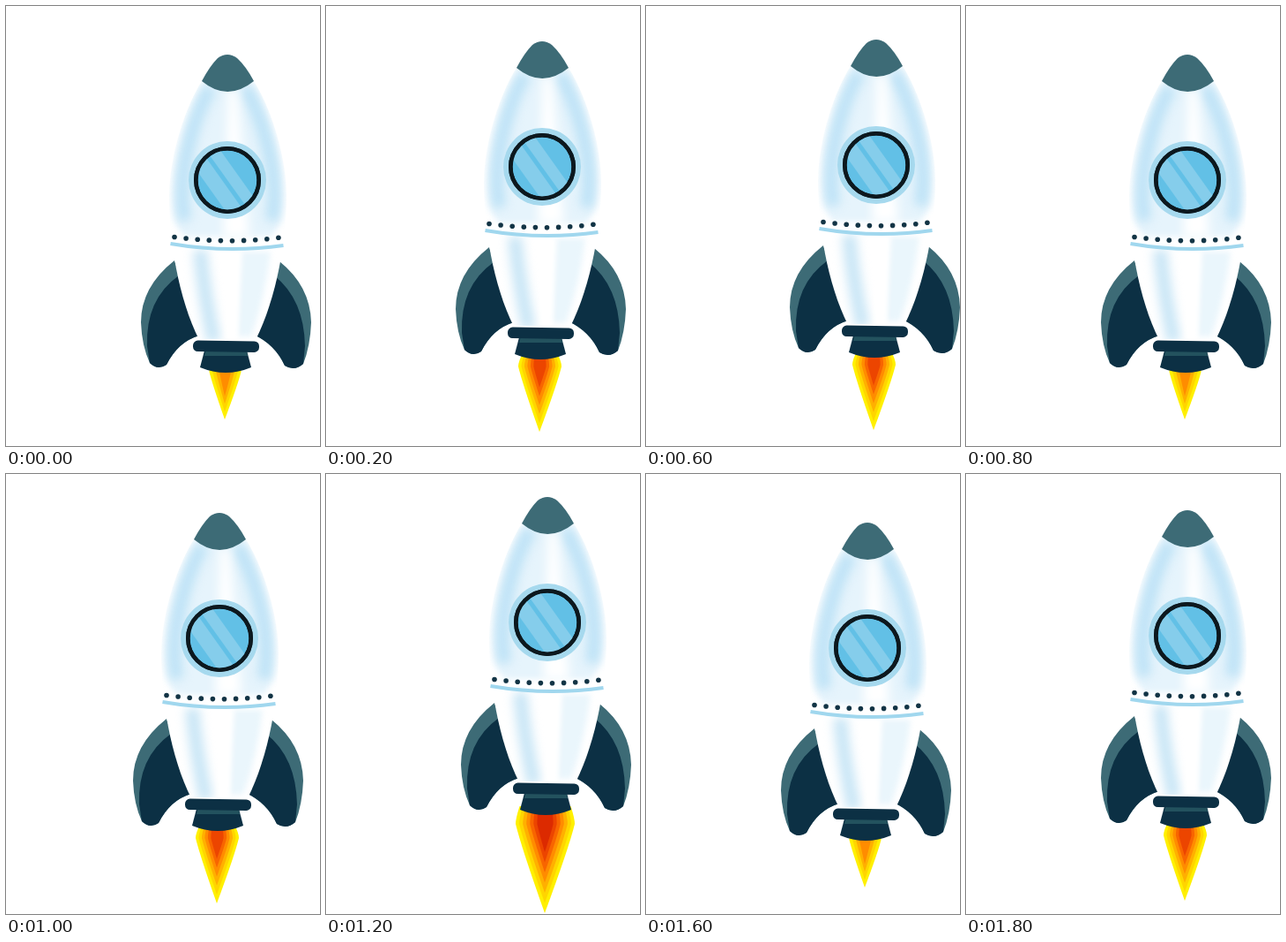
An HTML page for the animation above (2000 ms loop, 356x498 px).

```html
<!DOCTYPE html>
<html lang="en">
<head>
<meta charset="utf-8">
<title>Rocket</title>
<style>
  html, body { margin: 0; height: 100%; overflow: hidden; background: #fff; }
  svg { display: block; width: 100vw; height: 100vh; }
  .soft { filter: blur(3px); }
  .softer { filter: blur(6px); }
  .teal { fill: #3d6b76; }
  .navy { fill: #0c3044; }
  .line { fill: none; }
</style>
</head>
<body>
<svg viewBox="0 0 356 498">
  <defs>
    <clipPath id="hull"><path d="M222 85C200 120 185 175 185 215C185 265 195 330 219 377H283C307 330 318 265 318 215C318 175 303 120 281 85Z"/></clipPath>
    <clipPath id="glass"><circle r="34"/></clipPath>
  </defs>
  <g id="rocket">
    <g id="flame"></g>

    <path class="teal" d="M191 288Q153 318 153 358Q154 385 163 404Q172 413 182 406Q195 380 219 373Z"/>
    <path class="navy" d="M196 305Q158 332 160 385L163 404Q172 413 182 406Q195 380 219 373Z"/>
    <path class="teal" d="M310 289Q345 317 346 358Q345 385 337 405Q327 414 316 407Q305 383 281 372Z"/>
    <path class="navy" d="M304 305Q338 332 339 385L337 405Q327 414 316 407Q305 383 281 372Z"/>

    <path fill="#fff" d="M222 85C200 120 185 175 185 215C185 265 195 330 219 378H283C307 330 318 265 318 215C318 175 303 120 281 85Z"/>
    <g clip-path="url(#hull)">
      <path class="soft" fill="#e6f4fc" d="M224 85C203 122 189 175 189 215Q189 250 203 261H300Q314 250 314 215C314 175 300 122 279 85Z"/>
      <g class="softer line" stroke="#bde2f6" stroke-width="15">
        <path d="M232 92C213 125 200 175 200 212Q200 230 203 243"/>
        <path d="M271 92C290 125 304 175 304 212Q304 230 301 243"/>
      </g>
      <path class="softer" fill="#fff" d="M252 95H262L276 262H246Z"/>
      <path class="soft" fill="#eaf6fc" d="M262 278H300Q294 330 278 374H262Z"/>
      <path class="softer line" stroke="#c9e6f6" stroke-width="16" d="M220 276Q225 330 236 380"/>
      <path class="soft" fill="#fff" d="M247 276H268L262 378H250Z"/>
    </g>
    <path class="teal" d="M222 85Q231 68 240 59Q251 51 262 59Q272 68 281 85Q251 109 222 85Z"/>

    <g transform="translate(251 197)">
      <circle r="44" fill="#a6d9ee"/>
      <circle r="38" fill="#0c181e"/>
      <circle r="33.5" fill="#62c0e6"/>
      <g clip-path="url(#glass)"><g transform="rotate(-35.5)" fill="#85cdeb">
        <rect x="-22" y="-33" width="17" height="66"/>
        <rect x="0" y="-33" width="13" height="66"/>
      </g></g>
      <circle r="35.7" class="line" stroke="#0c181e" stroke-width="4.6"/>
    </g>

    <g id="rivets" fill="#123445"></g>
    <path class="line" stroke="#a0d7ee" stroke-width="4" d="M186.500 269Q251 280 314.500 271"/>

    <path class="navy" d="M225 390L220 409Q249 421 278 409L273 390Z"/>
    <path fill="#23525e" d="M226 391H273L274 396H225Z"/>
    <rect class="navy" x="212" y="379" width="75" height="12.500" rx="5.500" transform="rotate(.7 249 385)"/>
  </g>
</svg>
<script>
const $ = id => document.getElementById(id);
const STEP = 200;
const COLORS = ['#fff000', '#ffd500', '#ffb000', '#ff8c00', '#f86500', '#ec4500', '#dc2a00'];

// Flame sizes: half width at nozzle and shoulder, shoulder y, tip y, layers, tip shrink per layer
const FLAMES = {
  small: [17.5, 18, 414, 468, 4, .14],
  mid: [18, 24.5, 423, 497, 6, .11],
  large: [29, 33.5, 425, 526, 7, .095]
};

// Offset and flame of each pose
const POSES = [
  [0, 0, 'small'], [-6, -15, 'mid'], [0, -29, 'large'], [10, -17, 'mid'], [0, 0, 'small'],
  [-9, -11, 'mid'], [0, -29, 'large'], [7, -11, 'mid'], [0, 0, 'small'], [0, -14, 'mid']
];

function flame([nozzle, wide, shoulder, tip, layers, shrink]) {
  const cx = 248.5, top = 405;
  return COLORS.slice(0, layers).map((color, i) => {
    const s = 1 - i * .85 / layers, n = nozzle * s, w = wide * s;
    const end = top + (tip - top) * (1 - i * shrink);
    const mid = shoulder + (end - shoulder) * .25;
    return `<path fill="${color}" d="M${cx - n} ${top}Q${cx - w} ${shoulder - 6} ${cx - w} ${shoulder}` +
      `Q${cx - w * .82} ${mid} ${cx - .5} ${end}Q${cx + w * .82} ${mid} ${cx + w} ${shoulder}` +
      `Q${cx + w} ${shoulder - 6} ${cx + n} ${top}Z"/>`;
  }).join('');
}

$('rivets').innerHTML = Array.from({ length: 10 }, (_, i) => {
  const x = 191 + 13.1 * i;
  return `<circle cx="${x}" cy="${265.7 - .0011 * (x - 253) ** 2}" r="2.8"/>`;
}).join('');

let shown = -1;
function draw() {
  const pose = Math.floor(performance.now() / STEP) % POSES.length;
  if (pose !== shown) {
    const [x, y, size] = POSES[shown = pose];
    $('rocket').setAttribute('transform', `translate(${x} ${y})`);
    $('flame').innerHTML = flame(FLAMES[size]);
  }
  requestAnimationFrame(draw);
}
draw();
</script>
</body>
</html>
```
